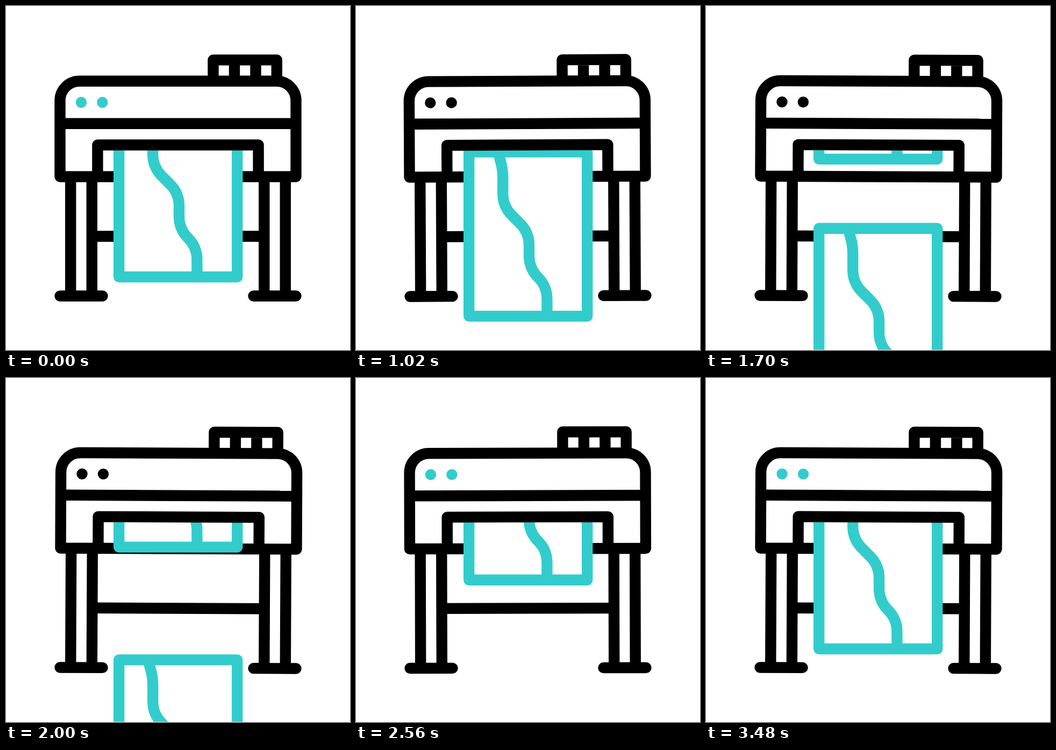
Recreate the animation shown at these times as an HTML page. Size 640 px wide and 640 px high, loop 3.6 s.

```html
<!DOCTYPE html>
<html lang="en">
<head>
<meta charset="utf-8">
<title>Plotter</title>
<style>
  html, body { margin: 0; width: 100%; height: 100%; overflow: hidden; background: #fff; }
  svg { display: block; width: 100vw; height: 100vh; }
  .line { fill: none; stroke: #000; stroke-width: 20.4; stroke-linejoin: round; }
  .sheet { fill: #fff; stroke: #3cc; stroke-width: 20.4; stroke-linejoin: round; }
  .river { fill: none; }
</style>
</head>
<body>
<svg viewBox="0 0 640 640">
  <defs>
    <clipPath id="outlet"><rect x="180" y="258.5" width="280" height="381"/></clipPath>
    <!-- the sheet's bottom line lies at y = 0 -->
    <g id="paper">
      <rect x="210.2" y="-305.5" width="220" height="305.5"/>
      <path class="river" d="M264.5 -305 L270.5 -282 Q273.2 -271 273.2 -257 V-228
        a57 57 0 0 0 16.7 40.3 l15.4 15.4 a57 57 0 0 1 16.7 40.3 v19.5
        a57 57 0 0 0 16.7 40.3 a57 57 0 0 1 16.7 40.3 V0"/>
    </g>
  </defs>

  <g class="line sway">
    <path d="M120.2 317.5 V539.5 M159.8 317.5 V539.5 M480.3 317.5 V539.5 M519.8 317.5 V539.5"/>
    <path d="M159.8 428.5 H480.3"/>
    <path stroke-linecap="round" d="M100.5 539.5 H179.5 M460.5 539.5 H539.5"/>
    <path d="M100.5 317.5 V175.8 a36 36 0 0 1 36 -36 H503.5 a36 36 0 0 1 36 36 V317.5 Z"/>
    <path d="M100.5 218.8 H539.5"/>
    <path d="M385.5 139.8 V100.4 H503.8 V139.8 M425 100.4 V139.8 M464.5 100.4 V139.8"/>
    <g id="lamps" stroke="none">
      <circle cx="139.9" cy="179.3" r="10.2"/>
      <circle cx="179.3" cy="179.3" r="10.2"/>
    </g>
  </g>

  <g clip-path="url(#outlet)">
    <use class="sheet" href="#paper"/>
    <use class="sheet" href="#paper"/>
  </g>

  <path class="line sway" d="M170.4 317.5 V258.5 H469.6 V317.5"/>
</svg>

<script>
const LOOP = 3600, LEAD = 200, STEP = 20, LAST = 165;
const LAMP_STEPS = 24;
const EMERGE = { n: 62, y: 258, v: 1.9 };
const SEAM = { n: LAST, y: 504, v: 3.3 };
const REST = { n: 192, y: 562.4, v: 0.2 };
const GRAVITY = 0.0653;

const swaying = document.querySelectorAll(".sway");
const sheets = document.querySelectorAll(".sheet");
const lamps = document.getElementById("lamps");

// cubic between two points with given speeds
function glide(a, b, n) {
  const d = b.n - a.n, u = (n - a.n) / d, w = 1 - u;
  return a.y * w * w * (1 + 2 * u) + b.y * u * u * (1 + 2 * w)
       + d * u * w * (a.v * w - b.v * u);
}

// the sheet is fed out, pauses, then falls
function sheetY(n) {
  if (n < EMERGE.n) return 240;
  if (n < SEAM.n) return glide(EMERGE, SEAM, n);
  if (n < REST.n) return glide(SEAM, REST, n);
  return REST.y + GRAVITY * (n - REST.n) ** 2;
}

// a shake whose pace drifts slowly
function tilt(n) {
  const TAU = 2 * Math.PI;
  const cycles = 0.0675 * n + 0.135 * Math.sin(TAU * n / 70);
  return 0.26 * Math.sin(TAU * cycles);
}

function draw(now) {
  const t = now % LOOP;
  const n = t < LEAD ? 0 : Math.min(LAST, Math.floor((t - LEAD) / STEP) + 1);
  const turn = `rotate(${tilt(n)} 320 539.5)`;
  swaying.forEach(el => el.setAttribute("transform", turn));
  sheets.forEach((el, i) =>
    el.setAttribute("transform", `translate(0 ${sheetY(i ? n : n + LAST)})`));
  lamps.setAttribute("fill", Math.floor(n / LAMP_STEPS) % 2 ? "#000" : "#3cc");
}

const start = performance.now();
function tick() {
  draw(performance.now() - start);
  requestAnimationFrame(tick);
}
tick();
</script>
</body>
</html>
```
